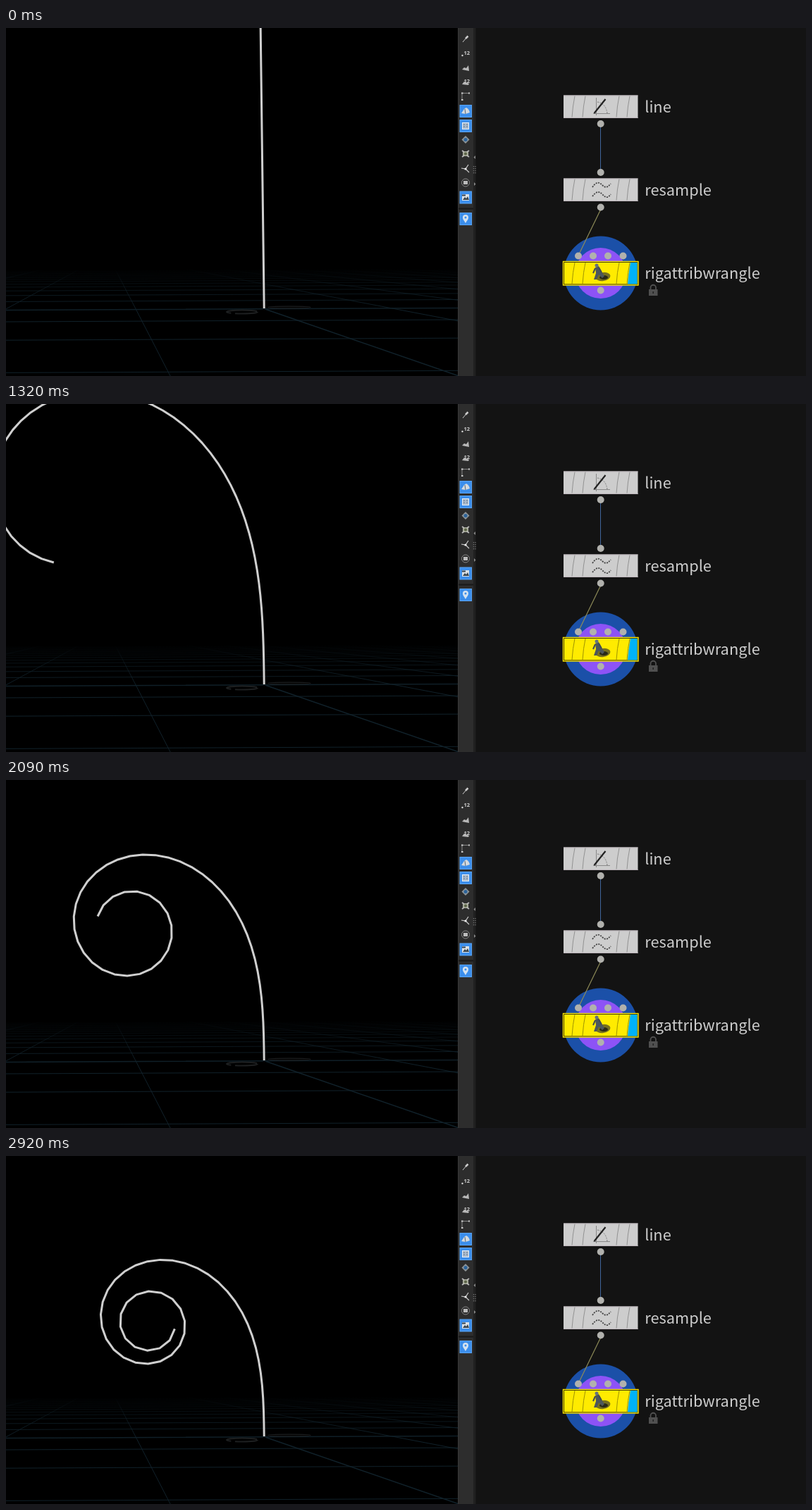
Recreate the animation shown at these times as an HTML page. Size 1135 by 494 pixels, loop 3.13 s.

```html
<!DOCTYPE html>
<html lang="en">
<head>
<meta charset="utf-8">
<title>Curling line</title>
<style>
html, body { margin: 0; width: 100%; height: 100%; overflow: hidden; background: #000; }
svg { display: block; width: 1135px; height: 494px; }
text { font: 21.8px "Noto Sans CJK SC", "Noto Sans CJK JP", "Noto Sans CJK", "Noto Sans", sans-serif; fill: #cdcdcd; }
.tiny { font: bold 7.5px "Open Sans", sans-serif; fill: #d0d0d0; }
</style>
</head>
<body>
<svg viewBox="0 0 1135 494" fill="none">
  <defs>
    <linearGradient id="fade" gradientUnits="userSpaceOnUse" x1="0" y1="342" x2="0" y2="405">
      <stop offset="0" stop-color="#10212a" stop-opacity="0"/>
      <stop offset=".5" stop-color="#10212a" stop-opacity=".65"/>
      <stop offset="1" stop-color="#10212a"/>
    </linearGradient>
    <path id="ribs" d="M16 1Q13 15 12 31M31 1Q28 15 27 31M79 1Q76 15 75 31M94 1Q91 15 90 31"/>
    <g id="plate">
      <rect width="105.500" height="32.500" fill="#cdcdcd"/>
      <path d="M0 .5H105.500M0 32H105.500" stroke="#bdb5bb"/>
      <use href="#ribs" stroke="#929292"/>
    </g>
  </defs>

  <rect width="641" height="494" fill="#000"/>
  <g id="grid" stroke="url(#fade)"/>
  <g stroke="#1d1f20" stroke-width="2">
    <ellipse cx="335" cy="403" rx="22" ry="2.500" stroke-dasharray="32 6 50 5"/>
    <ellipse cx="402" cy="396.500" rx="30" ry="1.300" stroke-width="1.200"/>
  </g>
  <polyline id="curl" stroke="#cfcfcf" stroke-width="3" stroke-linejoin="round"/>

  <!-- toolbar -->
  <rect x="641" width="494" height="494" fill="#131313"/>
  <rect x="641" width="22" height="494" fill="#2d2d2d"/>
  <path d="M641.500 0V494" stroke="#373737"/>
  <rect x="663" width="3.500" height="494" fill="#202020"/>
  <path d="M642 256.500H663" stroke="#191919" stroke-width="2"/>
  <path d="M663.500 196V208M666 196V208" stroke="#777" stroke-width="1.300" stroke-dasharray="1.300 1.700"/>
  <path d="M666 181V186L663.500 183.500ZM664 219V224L666.500 221.500Z" fill="#888"/>
  <g id="active" fill="#3b8eec" stroke="#5aa5f5"/>
  <g transform="translate(652 15)" stroke="#ccc"><path d="M-4 5L1-1"/><path d="M0 0L3.500-3.500" stroke-width="2.500"/></g>
  <circle cx="647.500" cy="39" r="1.200" fill="#ddd"/>
  <text class="tiny" x="649.500" y="38">12</text>
  <path d="M647 59L650 56L653 57L656 53L657 61ZM647 80L650 76L657 79L656 81Z" fill="#b8b8b8"/>
  <text class="tiny" x="649.500" y="78">12</text>
  <path d="M647 103V92.500H658" stroke="#888"/>
  <path d="M646 92.500H648.500M646 102H648.500M656 92.500H658" stroke="#ccc" stroke-width="2"/>
  <path d="M646 121L650 115L653 113Q657 115 658 120L652 122Z" fill="#d3d9df"/>
  <path d="M651 115L652 122" stroke="#567"/>
  <rect x="647.500" y="134.500" width="9" height="9" fill="#a9bacd" stroke="#e5edf5"/>
  <path d="M649 137H655M649 140H655" stroke="#678" stroke-dasharray="2 2"/>
  <path d="M652 153L657.500 158.500L652 164L646.500 158.500Z" fill="#8c9498"/>
  <circle cx="652" cy="158.500" r="2.500" fill="#2b6299"/>
  <rect x="648" y="175" width="8" height="7" fill="#a5a896"/>
  <path d="M647 174L650 176M657 174L654 176M647 183L650 181M657 183L654 181" stroke="#bbb" stroke-width="1.700"/>
  <circle cx="652" cy="178.500" r="2" fill="#5c6549"/>
  <path d="M646 199L652 200L656 194M652 200L657 205" stroke="#ccc" stroke-width="1.200"/>
  <circle cx="652" cy="200" r="1.600" fill="#eee"/>
  <circle cx="652" cy="219.500" r="5.500" stroke="#888"/>
  <rect x="649" y="217" width="6" height="5" fill="#bbb"/>
  <rect x="647" y="236" width="10" height="9" fill="#dde1e5"/>
  <path d="M648 244L651 240L653 242L655 239L657 244Z" fill="#3a4650"/>
  <path d="M647 237.500H652" stroke="#345" stroke-width="2"/>
  <path d="M652 277C650 273 648 272 648 269A4 4 0 0 1 656 269C656 272 654 273 652 277Z" fill="#d5e2ef"/>
  <circle cx="652" cy="269" r="1.500" fill="#3b8eec"/>

  <!-- network -->
  <circle cx="843.700" cy="348" r="52.500" fill="#1b50a8"/>
  <circle cx="843.700" cy="348" r="36" fill="#8d53f6"/>
  <path d="M843.500 140V201" stroke="#41659b"/>
  <path d="M843.500 258L812 323" stroke="#8d8b58" stroke-width="1.200"/>
  <use href="#plate" x="791" y="95.500"/>
  <use href="#plate" x="791" y="213.500"/>
  <path d="M837.500 99V124M833 121.500H857" stroke="#888"/>
  <path d="M839 105Q851 107 853 121" stroke="#777" stroke-dasharray="2 1.500"/>
  <path d="M834.500 121L850.500 101" stroke="#222" stroke-width="2.200"/>
  <g stroke="#444" stroke-width="1.800" stroke-dasharray="2 1.500">
    <path d="M832 226C838 217 842 219 846 223S853 227 858 221"/>
    <path d="M832 239C838 231 842 232 846 236S853 243 858 236"/>
  </g>

  <rect x="790.500" y="331.500" width="106.500" height="33.500" fill="#181600" stroke="#ffe900" stroke-width="1.400"/>
  <rect x="792" y="333" width="103.500" height="30.500" fill="#ffeb00"/>
  <path d="M886 333H895.500V363.500H882Q883 350 886 333Z" fill="#00b2f8"/>
  <use href="#ribs" x="791" y="332" stroke="#9d9300"/>
  <ellipse cx="847" cy="353" rx="10.500" ry="6" fill="#77701f" transform="rotate(-8 847 353)"/>
  <ellipse cx="848" cy="354" rx="6" ry="3" fill="#292917"/>
  <path d="M836 340L841 338L845 346L849 352L846 355L841 350L838 357L834 357L837 348Z" fill="#4c565c"/>
  <path d="M836 341L833 348M841 340L845 347" stroke="#424b52" stroke-width="2"/>
  <circle cx="838" cy="337" r="2.500" fill="#66727c"/>
  <g id="dots" fill="#b1b1ad"/>

  <rect x="912" y="371" width="12.500" height="9" fill="#505050"/>
  <path d="M914.500 371V368.500A3.700 3.700 0 0 1 922 368.500V371" stroke="#505050" stroke-width="1.800"/>
  <path d="M918.200 374V377" stroke="#222" stroke-width="1.500"/>
  <text x="906.200" y="119.500">line</text>
  <text x="906.200" y="237.500">resample</text>
  <text x="906.200" y="356">rigattribwrangle</text>
</svg>
<script>
const LOOP = 3130, SEGMENTS = 50, LENGTH = 18.05, LEAN = 0.0126;
const BASE_X = 366.2, BASE_Y = 398.1;
// [step, bend in degrees]: heading grows with the square of the distance
const BENDS = [[0, 0], [3, .0252], [8, .059], [10, .0737], [16, .118], [18, .1366],
  [24, .202], [25, .209], [30, .2508], [32, .265], [37, .2839]];
const byId = id => document.getElementById(id);

function drawGrid() {
  const vx = 144, vy = 321;
  let d = '';
  for (let i = -3; i < 15; i++) {
    if (!i) continue; // the axis is drawn on its own
    const y = vy + 1 / (.0129 + .0023 * i);
    d += `M0 ${y + 1.7}L641 ${y - 1.3}`;
  }
  for (let i = -8; i < 10; i++) {
    if (i === 1) continue;
    const slope = .515 + 2.365 * i;
    d += `M${vx + slope * 20} ${vy + 20}L${vx + slope * 175} ${vy + 175}`;
  }
  byId('grid').innerHTML = `<path d="${d}"/>
    <path d="M0 400.500L641 397.500M366 398.500L641 493.500" stroke-width="1.500"/>`;
}

byId('active').innerHTML = [118, 139, 240.5, 271].map(y =>
  `<rect x="644" y="${y - 8.5}" width="16.500" height="17"/>`).join('');
byId('dots').innerHTML = [[843.7, 136], [843.7, 205], [843.7, 254.5], [843.7, 372.5],
  [812, 323.5], [833, 323.5], [854, 323.5], [875.5, 323.5]]
  .map(([x, y]) => `<circle cx="${x}" cy="${y}" r="5"/>`).join('');

// Steps last 70 ms, apart from two of 60 ms.
function stepAt(t) {
  if (t < 420) return 0;
  const even = t + (t >= 620 ? 10 : 0) + (t >= 2290 ? 10 : 0);
  return Math.min(37, Math.floor((even - 420) / 70) + 1);
}

function bendAt(step) {
  const i = Math.max(1, BENDS.findIndex(b => b[0] >= step));
  const [s0, b0] = BENDS[i - 1], [s1, b1] = BENDS[i];
  return b0 + (b1 - b0) * (step - s0) / (s1 - s0);
}

function draw(now) {
  const bend = bendAt(stepAt(now % LOOP)) * Math.PI / 180;
  let x = 0, y = 0, points = `${BASE_X},${BASE_Y}`;
  for (let i = 0; i < SEGMENTS; i++) {
    const angle = bend * (i + .5) ** 2;
    x += LENGTH * Math.sin(angle);
    y += LENGTH * Math.cos(angle);
    points += ` ${BASE_X - x - LEAN * y},${BASE_Y - y}`;
  }
  byId('curl').setAttribute('points', points);
  requestAnimationFrame(draw);
}

drawGrid();
draw(performance.now());
</script>
</body>
</html>
```
